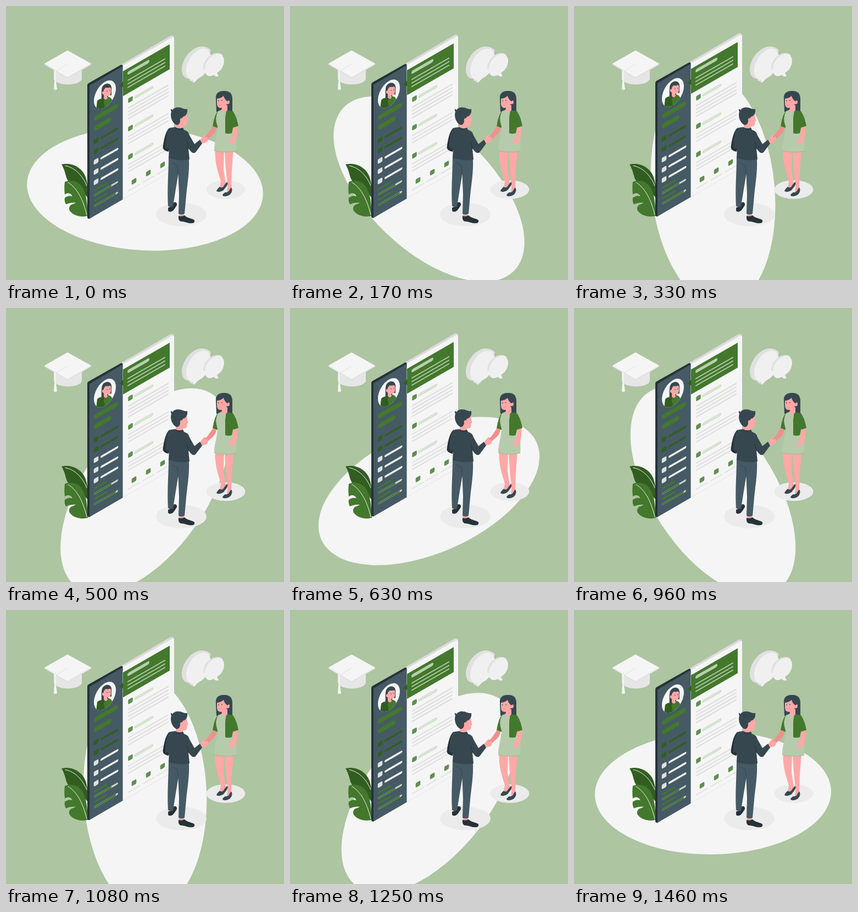
Write an HTML page that moves like this. It is 506 by 500 pixels and loops after 1.5 s.

```html
<!DOCTYPE html>
<html lang="en">
<head>
<meta charset="utf-8">
<title>Job interview</title>
<style>
  html, body { margin: 0; width: 100%; height: 100%; overflow: hidden; background: #adc5a1; }
  svg { display: block; width: 100%; height: 100%; }
  .pale { fill: #f5f5f5; } .mist { fill: #ebebeb; } .grey { fill: #e0e0e0; }
  .green { fill: #43782d; } .moss { fill: #315e20; } .sage { fill: #b6cbab; }
  .slate { fill: #455a64; } .coal { fill: #37474f; } .ink { fill: #263238; }
  .skin { fill: #ffa8a7; } .blush { fill: #f28f8f; }
  .line { fill: none; stroke-linecap: round; stroke-linejoin: round; }
</style>
</head>
<body>
<svg viewBox="0 0 506 500">
  <ellipse id="disc" class="pale" cx="253" cy="334" rx="215" ry="112"/>
  <ellipse class="mist" cx="319" cy="380.5" rx="46" ry="21.5"/>
  <ellipse class="mist" cx="400" cy="335" rx="35.5" ry="17"/>

  <g id="cap">
    <path fill="#e6e6e6" d="M87 114V133C90 146 134 147 138 133V114Z"/>
    <path class="grey" d="M70 105V107L112 132L155 107V105Z"/>
    <path class="pale" d="M70 105L112 81L155 105L112 130Z"/>
    <path class="line" stroke="#e0e0e0" d="M112 106L91 119"/>
    <path class="line" stroke="#f5f5f5" stroke-width="2" d="M89.5 118V138"/>
    <path class="pale" d="M88 137H91L93 152Q90 154 87 152Z"/>
  </g>

  <g id="bubbles">
    <path class="grey" d="M320 116C320 99 335 77 353 74C362 73 369 76 373 81L352 130L342 140L333 135L335 133C325 133 320 127 320 116Z"/>
    <path fill="#f0f0f0" d="M328 119C328 101 341 82 356 78C367 76 373 83 373 95C373 112 362 127 350 132L342 140L341 135C332 134 328 128 328 119Z"/>
    <path class="grey" d="M359 114C359 101 369 88 382 86C388 85 392 87 394 89L381 127Z"/>
    <path fill="#f0f0f0" d="M362 116C362 103 371 91 383 88C392 86 397 92 397 100C397 110 391 118 384 122L387 128Q382 130 378 126C368 131 362 126 362 116Z"/>
  </g>

  <g id="leaves">
    <path class="moss" d="M101 289C117 285 134 292 142 306C147 315 149 325 149 350C139 338 128 332 117 323C107 315 110 303 101 289Z"/>
    <path class="line" stroke="#f5f5f5" d="M108 291.500C126 295 139 309 147 328"/>
    <path class="green" d="M107 321C119 316 132 320 139 331C145 341 148 354 149 383C137 386 124 383 117 375C114 371 114 367 118 363Q124 361 127 359Q119 358 109 362C107 358 106 354 107 350Q113 345 120 347Q122 350 119 344Q113 339 107 344C106 336 106 329 107 321Z"/>
    <path class="line" stroke="#f5f5f5" d="M113 322C131 333 141 356 147 381"/>
  </g>

  <g id="panel">
    <path fill="#dbdbdb" d="M211 106L300 54Q306 53 306 59L212 112Z"/>
    <path class="pale" d="M212 109.5L302 57.5Q306 56 306 60V299L212 353Z"/>
    <path class="line" stroke="#dedede" stroke-width=".7" d="M212 353L306 299"/>
    <path class="ink" d="M148 145Q148 142 150 141L209 107.5Q212 106.500 212.500 109V114L153 148V388Q148 389 148 385Z"/>
    <path class="slate" d="M152 147Q152 145 154 144L210 111Q212.500 110 212.500 113V353L154 387Q152 388 152 386Z"/>
    <g id="page" transform="matrix(1 -.577 0 1 0 122.3)">
      <path class="green" d="M213 119.500H298V165H213Z"/>
    </g>
    <path class="moss" d="M206 145L213 138V148Z"/>
    <clipPath id="portrait"><ellipse cx="180" cy="143.500" rx="20" ry="23.500" transform="matrix(1 -.577 0 1 0 122.3)"/></clipPath>
    <g clip-path="url(#portrait)">
      <path class="pale" d="M158 130H204V194H158Z"/>
      <path class="coal" d="M174 154C174 146 179 142 185 141.500C191 142 193 147 192 155V163H186V175H172C175 169 173 161 174 154Z"/>
      <path class="moss" d="M166 173Q170 169 176 169L184 190H164Z"/>
      <path class="green" d="M178 172L186 166Q192 166 194 174V190H180Z"/>
      <path class="skin" d="M178 150L188 147L191 150Q192 160 189 163Q187 165 184 164L185 168Q183 173 178 169V162Q174 161 175 157Q176 155 178 156Z"/>
      <path class="coal" d="M177 154Q180 151 181 149Q187 150 190 148L185 143L177 146Z"/>
      <path class="line" stroke="#263238" stroke-width="1" d="M184 155V156M189 154V155"/>
    </g>
  </g>

  <g id="man">
    <path class="skin" d="M296 362H304V373H296ZM315 375H324V386H315Z"/>
    <path class="ink" d="M295 368Q300 368 303 361Q306 356 310 359C313 363 309 366 306 371C302 377 295 376 295 373ZM314 383Q320 385 325 382C330 387 336 387 342 390Q345 393 341 396C332 398 326 393 318 393Q313 391 314 383Z"/>
    <path class="slate" d="M296 275L333 279C334 305 330 324 328 346L325 379Q319 382 314 379L315 344L313.500 307L309 334L304 366Q299 368 295 365C293 334 296 305 296 275Z"/>
    <path class="line" stroke="#37474f" stroke-width="1" d="M313 306L312 291L303 286"/>
    <path class="ink" d="M298 222C290 228 287 246 285.500 258Q286 264 296 266L302 240Z"/>
    <path class="skin" d="M309 211H322V224Q315 228 309 222Z"/>
    <path class="skin" d="M316 198L329 195Q329 202 331.500 209L329.500 211Q330 219 326 219.500L319 220L312 214Z"/>
    <path class="coal" d="M300 188Q302 188 303 190C308 183 317 185 322 187Q327 189 330 188C331 195 328 201 322 202L320 206Q316 205 317 211Q315 218 310 217C302 213 298 201 301 193Q299 190 300 188Z"/>
    <path class="skin" d="M317 206Q320 203 322 206V211Q317 213 317 206Z"/>
    <path class="skin" d="M353 246C355 241 358 239 362 235L363 238L361 241L367 241Q369 246 364 249L356 251Z"/>
    <path class="coal" d="M308 221Q315 225 322 222L324 226Q332 228 334 236L343 252L353 244L357 251L345 267Q341 270 337 266L332 260L334 280Q315 284 296 277L297 261L290 259C290 242 293 225 300 222Z"/>
    <path class="line" stroke="#263238" stroke-width="1" d="M308 222Q315 228 322 224M332 260L329 248"/>
  </g>

  <g id="woman">
    <path class="skin" d="M380.500 261H397L396 298L400 323L395 333L389 331L391 320C385 300 380 286 380.500 261ZM398 261H414L411 301L410 333L406 342L402 341L403.500 327Q399 293 398 261Z"/>
    <path class="coal" d="M389 330Q394 334 398 326L402 321Q405 323 402 328L396 336Q389 341 383 338Q384 334 389 330ZM399 340Q405 341 407 335L410 331Q413 335 410 341Q406 348 396 347Q391 345 399 340Z"/>
    <path class="coal" d="M382 169C381 160 387 155 395 155C407 154 412 159 412 170V193H383Z"/>
    <path class="green" d="M386 191Q379 199 376 220L387 223L391 195Z"/>
    <path class="sage" d="M386 192Q393 188 402 192L400 231L411 231L419 238Q420 254 419 265Q399 270 379 264C379 247 385 234 385 220Q379 204 386 192Z"/>
    <path class="line" stroke="#91aa86" stroke-width=".6" d="M379 264Q399 269 419 265"/>
    <path class="skin" d="M413 217L422 217C421 231 421 240 418 245Q414 253 407 252L405.500 247L412 238Z"/>
    <path class="green" d="M401 190L413 192C418 199 421 208 423 219L413 222L411 232Q405 234 399 232V204Z"/>
    <path class="skin" d="M392 181H403V190Q399 196 390 191L393 188Z"/>
    <path class="skin" d="M384 167L398 162L402 173Q407 170 407 176Q406 180 402 179Q399 186 390 186Q384 185 384 178Z"/>
    <path class="coal" d="M383 169Q391 169 396 164Q398 171 403 174L407 171L401 157L386 160Z"/>
    <path class="line" stroke="#263238" stroke-width="1.200" d="M387 172.500V173.500M393 172V173"/>
    <path class="line" stroke="#f28f8f" d="M388 181Q390 182 392 180"/>
    <path class="blush" d="M377 219L383 222Q382 232 372 239L364 246Q360 251 355 248L358 241L366 235Z"/>
    <path class="skin" d="M355 244L360 236L362 240L367 239L367 246Q361 252 356 249Z"/>
  </g>
</svg>
<script>
const disc = document.getElementById('disc');
const panel = document.getElementById('panel');
const page = document.getElementById('page');

function add(tag, attrs) {
  const node = document.createElementNS('http://www.w3.org/2000/svg', tag);
  for (const key in attrs) node.setAttribute(key, attrs[key]);
  page.append(node);
}
// Bars and squares lie in the slanted plane of the page.
const bar = (x1, x2, y, width, stroke) =>
  add('path', { d: `M${x1 + width / 2} ${y}H${x2 - width / 2}`, stroke, class: 'line', 'stroke-width': width });
const square = (x, y, size, fill) =>
  add('rect', { x: x - size / 2, y: y - size / 2, width: size, height: size, rx: 2, fill });

const GREEN = '#43782d', MOSS = '#315e20', SAGE = '#b8ceae', LEAF = '#5f8f50',
  GREY = '#e0e0e0', PALE = '#f5f5f5';

bar(221, 261, 128.5, 6, SAGE);
for (const y of [141.3, 147.8, 154.3]) bar(221, 290, y, 2, SAGE);

[179, 231, 282.5].forEach((y, section) => {
  square(226.5, y, 8.5, LEAF);
  bar(234, 268, y + 1, 5, SAGE);
  bar(234.5, 267.5, y + 1, 4, '#d9e5d4');
  for (let i = 0; i < (section ? 3 : 4); i++) {
    bar(222, 296, y + 13.5 + i * 6.4, 2.4, section ? GREY : '#d2d2d2');
    if (!section) bar(222.5, 295.5, y + 13.5 + i * 6.4, 1, '#ececec');
  }
});
for (const x of [233, 259, 285]) {
  square(x, 332, 8.5, LEAF);
  bar(x - 11, x + 11, 343.5, 2, GREY);
}

bar(160, 204, 176.5, 9, GREEN);
bar(160, 192, 194.5, 9, GREEN);
for (let i = 0; i < 5; i++) {
  const y = 218.3 + i * 18.7;
  square(164, y, 8.5, i < 2 ? MOSS : GREY);
  bar(172, 204.5, y, 4, i < 2 ? MOSS : PALE);
}
[184, 192, 184, 200].forEach((end, i) => {
  const y = 306.5 + i * 9.6;
  if (i % 2) bar(160, 204, y, 3.6, '#c5d6bd');
  bar(160, end, y, 3.2, GREEN);
});

const LOOP = 1500, STEPS = 36;

function draw(now) {
  const time = now % LOOP;
  const step = Math.min(STEPS - 1, Math.floor((time + 5) * STEPS / LOOP));
  const phase = step / (STEPS - 1);
  const lift = 8.2 * Math.sin(Math.PI * phase) ** 1.6 || 0;
  disc.setAttribute('transform', `rotate(${3 + 356 * phase} 253 334)`);
  panel.setAttribute('transform', `translate(0 ${(-lift).toFixed(3)})`);
}

const start = performance.now();
function tick() {
  draw(performance.now() - start);
  requestAnimationFrame(tick);
}
tick();
</script>
</body>
</html>
```
